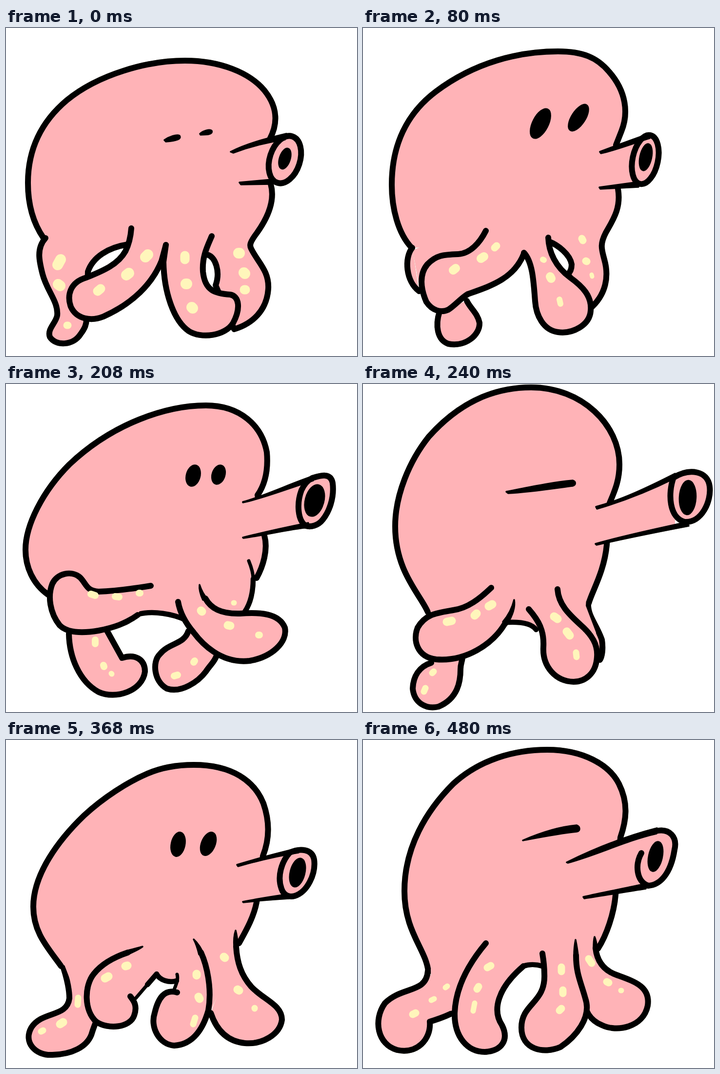
These frames come from a looping animation (720 px wide and 673 px high, 560 ms). An HTML page without scripts:

```html
<!DOCTYPE html>
<html lang="en">
<head>
<meta charset="utf-8">
<title>Walking octopus</title>
<style>
html, body { margin: 0; width: 100%; height: 100%; overflow: hidden; background: #fff; }
svg { display: block; width: 100%; height: 100%; }
path { stroke-linecap: round; stroke-linejoin: round; }
.skin { fill: #ffb3b7; stroke: #000; stroke-width: 12; }
.fill { fill: #ffb3b7; }
.line { fill: none; stroke: #000; stroke-width: 10.5; }
.thin { stroke-width: 7; }
.ink { stroke: #000; stroke-width: 2.5; }
path.ink { stroke-width: 3.5; }
.dot { fill: none; stroke: #fff6bb; }
.pose {
  visibility: hidden;
  filter: drop-shadow(0 0 .7px #d6cbb0);
  animation: show 560ms step-end calc(var(--i) * 80ms - 560ms) infinite;
}
@keyframes show {
  0% { visibility: visible; }
  14.2857%, 100% { visibility: hidden; }
}
</style>
</head>
<body>
<svg viewBox="0 0 720 673" preserveAspectRatio="none">

<g class="pose" style="--i:0">
  <path class="skin" d="M77 431C57 402 45 365 45 318C45 245 75 190 125 148C190 95 290 67 367 67C440 67 500 92 530 128C560 165 556 200 541 228L543 320C552 352 540 385 515 420C500 440 499 446 503 453C516 480 540 498 538 535C535 580 505 607 468 618L430 528C440 500 430 470 413 465"/>
  <path class="skin" d="M81 431C62 452 68 478 75 505C84 540 108 562 105 590C102 606 84 618 90 634C102 653 138 652 153 628C162 616 165 608 165 598L168 500C178 470 210 450 250 444"/>
  <path class="fill" d="M257 411L328 447L324 480L340 480L422 430L420 400Z"/>
  <path class="skin" d="M257 411C256 425 253 442 245 458C230 485 200 498 165 512C130 522 125 550 133 572C145 598 175 602 200 592C260 565 300 525 319 478L328 445"/>
  <path class="skin" d="M328 445L323 480C324 540 343 600 375 622C400 638 450 632 466 605C482 575 478 550 460 547C430 545 408 540 404 500C402 470 412 450 422 427"/>
  <path class="fill" d="M466 258L548 232V315L484 319Z"/>
  <ellipse class="skin" rx="31" ry="50" transform="translate(572 270)rotate(18)"/>
  <path class="ink" d="M461 254C490 239 525 229 575 217L572 229C530 235 495 245 466 256ZM479 317L545 311V320L482 321ZM325 230C335 223 350 218 356 221C360 228 350 231 328 233ZM398 217C405 211 418 207 422 211C424 218 414 219 399 219Z"/>
  <ellipse class="ink" rx="11" ry="22" transform="translate(572 268)rotate(18)"/>
  <path class="dot" stroke-width="22" d="M106 486l6-11M107 526l4 3M247 507l5-4M286 470l5-5M369 525h2M381 573l2 2M477 462h2M488 502l2 2"/>
  <path class="dot" stroke-width="19" d="M188 540l6-5M367 467v8M489 537h2"/>
  <path class="dot" stroke-width="15" d="M125 610h2"/>
</g>

<g class="pose" style="--i:1">
  <path class="skin" d="M100 451C72 422 59 370 59 322C59 240 90 175 150 130C230 70 320 48 400 48C450 48 480 60 505 90C540 130 545 175 530 212L519 240L523 330C530 370 512 395 498 420C485 445 490 455 495 475C505 510 498 545 470 572L420 505C424 502 428 495 428 485C425 465 400 445 381 438"/>
  <path class="fill" d="M102 456L240 400L380 430L330 462L230 480L130 540L116 535Z"/>
  <path class="skin" d="M101 451C84 472 88 520 115 540"/>
  <path class="skin" d="M157 582C148 610 152 640 175 648C210 655 240 630 239 605C235 585 220 575 213 560"/>
  <path class="skin" d="M252 416C240 440 220 463 195 464C165 465 150 466 132 485C115 505 118 535 130 562C142 580 160 585 175 578C190 568 200 555 215 546C260 530 310 515 330 463"/>
  <path class="skin" d="M380 430C381 460 395 490 425 512C450 530 470 550 467 580C465 610 430 628 400 624C370 620 355 590 353 560C350 520 348 480 330 461"/>
  <path class="fill" d="M488 257L575 225V320L488 329Z"/>
  <ellipse class="skin" rx="26" ry="51" transform="translate(579 270)rotate(12)"/>
  <path class="ink" d="M486 254C515 243 545 232 590 216L588 226C555 236 520 250 488 257ZM485 327L565 316V326L487 330Z"/>
  <ellipse class="ink" rx="12" ry="28" transform="translate(580 265)rotate(12)"/>
  <ellipse class="ink" rx="16" ry="33" transform="translate(364 196)rotate(27)"/>
  <ellipse class="ink" rx="14" ry="31" transform="translate(442 184)rotate(33)"/>
  <path class="dot" stroke-width="18" d="M185 497l5-4M242 473l6-4M384 510l2 4"/>
  <path class="dot" stroke-width="15" d="M270 451l4-4M449 432l2 4M457 478l2 1"/>
  <path class="dot" stroke-width="12" d="M369 475l2 1M403 557l2 9"/>
  <path class="dot" stroke-width="9" d="M469 506l1 4"/>
</g>

<g class="pose" style="--i:2">
  <path class="skin" d="M86 432C55 410 40 375 40 340C40 290 75 220 130 165C220 80 330 44 410 44C480 44 525 85 535 140C538 175 532 205 516 228L530 311C538 340 527 375 514 398"/>
  <path class="skin" d="M129 512C130 560 150 610 190 632C225 648 280 630 285 590C285 565 265 553 238 562L207 506"/>
  <path class="skin" d="M374 507C365 535 335 530 315 555C300 570 303 610 330 625C360 635 395 610 410 590C420 575 428 570 432 557"/>
  <path class="fill" d="M98 420L200 380L508 395L490 468L400 500L370 485Q320 462 270 473Z"/>
  <path class="line" d="M270 473C300 464 345 472 370 485"/>
  <path class="line thin" d="M498 363C505 380 507 390 507 400"/>
  <path class="line" d="M507 400C507 430 500 452 490 467"/>
  <path class="skin" d="M297 414C260 420 220 425 190 426C165 425 165 410 152 397C135 382 105 388 95 410C85 435 90 470 110 495C125 510 155 512 190 506C220 500 245 492 270 474"/>
  <path class="skin" d="M409 440C420 460 440 472 480 471C520 468 560 470 572 500C578 530 545 560 500 568C440 575 400 530 385 510C368 490 357 470 353 447"/>
  <path class="ink" d="M397 412C401 425 406 433 413 441L404 443C398 430 396 420 397 412Z"/>
  <path class="fill" d="M490 244L628 193L615 290L490 314Z"/>
  <path class="skin" d="M628 193C645 188 666 181 670 203C674 235 662 263 650 278C640 291 625 294 615 291C598 280 596 245 606 218C612 205 620 197 628 193Z"/>
  <path class="ink" d="M486 242C530 230 580 206 630 189L630 198C590 210 530 234 486 243ZM486 315C530 304 575 294 620 285V294C580 298 530 310 487 316Z"/>
  <ellipse class="ink" rx="19" ry="33" transform="translate(633 239)rotate(15)"/>
  <ellipse class="ink" rx="14" ry="22" transform="translate(384 188)rotate(15)"/>
  <ellipse class="ink" rx="13" ry="20" transform="translate(436 186)rotate(18)"/>
  <path class="dot" stroke-width="17" d="M400 465l2 2M455 495l5 1"/>
  <path class="dot" stroke-width="14" d="M174 431l9 3M224 436l8 1M273 429h2M518 515h2M183 525v8M200 577l1 3M385 571l2-3M345 599l7-2"/>
  <path class="dot" stroke-width="11" d="M467 449h1M216 594l1 1"/>
</g>

<g class="pose" style="--i:3">
  <path class="skin" d="M133 468C118 432 66 385 66 292C66 228 95 158 135 108C194 42 262 7 345 7C450 7 526 85 526 165C526 200 515 222 506 244L500 330C495 385 470 425 463 450"/>
  <path class="skin" d="M462 450C460 475 480 495 490 525C493 545 490 560 486 566"/>
  <path class="skin" d="M140 572C115 580 103 600 102 625C105 655 130 668 155 662C195 645 200 610 200 585C200 575 203 570 204 562"/>
  <path class="fill" d="M138 466L265 400L458 440L457 455L478 510L480 560L440 520L356 502Q330 486 297 489L250 460L150 475Z"/>
  <path class="line" d="M297 489C320 488 345 490 355 504"/>
  <path class="skin" d="M263 418C240 440 215 460 185 464C150 470 128 472 112 500C102 525 110 560 150 565C210 570 265 535 291 492"/>
  <path class="ink" d="M310 443C313 460 305 478 295 494L287 488C298 475 306 460 310 443Z"/>
  <path class="skin" d="M399 421C401 452 422 472 446 494C470 515 482 535 480 560C478 595 455 611 432 611C395 610 368 580 370 540C372 505 360 485 340 462"/>
  <path class="fill" d="M481 256L560 226L640 190V288L481 328Z"/>
  <path class="skin" d="M637 192C625 225 628 275 660 283C695 285 715 240 711 210C707 178 670 172 637 192Z"/>
  <path class="ink" d="M478 252C530 238 585 212 640 184L640 193C590 218 535 240 480 256ZM477 328C540 310 600 298 662 284L668 291C600 304 540 316 479 330Z"/>
  <ellipse class="ink" rx="17" ry="35" transform="translate(666 233)rotate(3)"/>
  <path class="ink" d="M294 221C340 212 385 202 430 198C437 200 437 207 430 209C385 215 340 222 298 224Z"/>
  <path class="dot" stroke-width="17" d="M172 488l10-2M229 475l4-4M258 456l7-4M392 477l7 5M418 508l6 8"/>
  <path class="dot" stroke-width="13" d="M142 593l3-3M125 631l3-7M437 551l1 9"/>
</g>

<g class="pose" style="--i:4">
  <path class="skin" d="M113 464C85 425 56 395 56 342C56 275 108 205 160 155C200 118 250 86 290 69C320 56 350 51 385 51C465 51 510 85 528 130C542 170 540 205 527 238L514 333C508 365 490 395 478 417"/>
  <path class="skin" d="M118 468C125 490 130 515 130 530C125 570 75 555 52 590C35 620 60 648 95 646C135 645 165 630 175 605C178 595 180 590 183 582"/>
  <path class="fill" d="M120 462L280 420L472 405L471 440L418 560L351 515L350 494Q320 498 309 480L265 528L200 500L190 578L150 540Z"/>
  <path class="skin" d="M472 424C474 456 482 482 503 506C528 533 566 543 566 574C562 605 525 625 490 622C450 618 430 590 420 560"/>
  <path class="ink" d="M471 391C474 402 475 412 476 424L468 424C467 410 468 400 471 391Z"/>
  <path class="skin" d="M400 436C412 462 423 510 415 555C405 590 385 625 345 627C315 625 295 590 305 560C312 530 325 510 351 518"/>
  <path class="ink" d="M385 409C395 418 400 428 405 438L396 440C393 428 390 418 385 409Z"/>
  <path class="line" d="M309 480C315 493 335 499 350 494M309 480L290 502"/>
  <path class="line thin" d="M290 502L266 530M351 481C354 493 348 503 345 512"/>
  <path class="skin" d="M250 436C220 446 195 461 180 480C160 505 160 555 185 578C210 595 255 590 263 565C270 545 262 535 255 526"/>
  <path class="ink" d="M280 424C272 430 262 434 252 439L250 432C260 429 270 427 280 424Z"/>
  <path class="fill" d="M478 258L582 231L570 320L490 331Z"/>
  <path class="skin" d="M582 231C604 221 628 224 632 245C636 275 618 312 592 320C582 323 570 320 565 305C556 280 565 250 582 231Z"/>
  <path class="ink" d="M474 256C510 245 550 234 600 222L600 231C560 237 515 248 476 259ZM486 332C520 325 550 321 580 316V325C550 327 520 329 487 333Z"/>
  <ellipse class="ink" rx="15" ry="30" transform="translate(598 272)rotate(14)"/>
  <ellipse class="ink" rx="14" ry="25" transform="translate(353 214)rotate(12)"/>
  <ellipse class="ink" rx="14" ry="25" transform="translate(415 213)rotate(22)"/>
  <path class="dot" stroke-width="17" d="M203 489l7-4M245 464l4-1M111 583l6-4M391 480v3M395 527l2 4M447 445l2 2M475 512l3 2"/>
  <path class="dot" stroke-width="13" d="M148 529l-1 14M72 598l4-2M388 570l-4 13M510 550v1"/>
</g>

<g class="pose" style="--i:5">
  <path class="skin" d="M142 475C138 410 101 380 101 305C101 220 150 150 200 110C260 65 315 42 365 42C430 42 490 85 525 130C552 165 550 200 543 222L529 325C522 365 505 405 482 432"/>
  <path class="fill" d="M148 468L160 458L200 430L475 425L385 440C385 500 360 545 315 574L280 544L205 485Z"/>
  <path class="line" d="M384 442C385 500 360 545 315 574"/>
  <path class="skin" d="M152 465C143 480 130 488 105 488C75 488 50 470 25 475C5 485 5 520 15 550C30 580 60 588 95 582C140 575 185 530 208 485"/>
  <path class="ink" d="M161 457C156 464 152 469 148 472L146 466C152 464 157 461 161 457Z"/>
  <path class="skin" d="M464 427L514 470C545 470 590 460 598 492C602 530 570 578 515 576C450 570 395 510 385 450"/>
  <path class="ink" d="M385 438L389 452L381 452Z"/>
  <path class="skin" d="M210 475C212 520 210 560 225 595C240 628 285 640 303 605C315 570 305 548 280 544"/>
  <path d="M275 482C280 460 300 452 315 463C325 480 310 505 286 513Z" fill="#fff"/>
  <path class="line" d="M277 478C282 460 300 452 315 463C322 478 314 493 304 502M278 484C278 505 281 520 287 536"/>
  <path class="line thin" d="M304 502C299 508 293 511 286 513M274 473L277 485"/>
  <path class="fill" d="M466 260L545 230L620 212L600 311L476 324Z"/>
  <path class="skin" d="M620 212C645 210 657 225 655 250C652 285 635 308 605 311C580 310 570 285 583 255"/>
  <path class="ink" d="M462 260C510 232 560 217 622 207L622 217C560 227 510 242 464 262ZM472 324C515 316 560 312 600 307V318C560 320 515 325 473 326Z"/>
  <ellipse class="ink" rx="18" ry="33" transform="translate(619 263)rotate(16)"/>
  <rect class="ink" x="-12" y="-30" width="24" height="60" rx="12" transform="translate(355 207)rotate(10)"/>
  <rect class="ink" x="-12" y="-26" width="24" height="52" rx="12" transform="translate(416 207)rotate(22)"/>
  <path class="dot" stroke-width="22" d="M450 448l5 3M485 479l5 4"/>
  <path class="dot" stroke-width="15" d="M64 505h8M121 506l5-2M246 497l2 3M350 483l-2 6M339 516l-2 2"/>
  <path class="dot" stroke-width="10" d="M152 487h1M251 526l2 9M252 551h2M439 446l3 3M527 496l3-1"/>
</g>

<g class="pose" style="--i:6">
  <path class="skin" d="M134 476C130 430 85 395 85 310C85 220 130 145 185 90C240 40 310 20 378 20C450 20 505 50 525 90C545 130 540 165 528 200L518 318C515 355 500 400 482 428"/>
  <path class="skin" d="M133 474C130 520 80 505 45 540C20 575 30 625 70 636C110 645 140 615 137 578C155 572 170 568 187 558"/>
  <path class="fill" d="M139 470L250 417L474 410L476 430L460 540L372 480L368 464Q345 458 329 464L250 470L187 555L140 560Z"/>
  <path class="line" d="M329 464C340 460 355 460 368 464"/>
  <path class="skin" d="M477 427C480 455 495 473 520 482C555 495 590 505 584 545C575 590 520 600 490 585C465 575 455 555 452 530"/>
  <path class="ink" d="M475 404C478 410 479 420 481 428L473 428C473 420 473 410 475 404Z"/>
  <path class="skin" d="M437 442C437 480 447 497 456 530C470 570 435 610 405 630C370 645 325 635 325 590C325 540 375 540 372 480C372 465 370 450 368 438"/>
  <path class="ink" d="M436 410C438 420 440 432 441 442L433 442C433 430 434 420 436 410Z"/>
  <path class="skin" d="M252 417C220 455 190 505 188 560C187 610 215 640 250 640C285 638 300 615 285 585C265 555 275 510 329 464"/>
  <path class="fill" d="M424 250L528 206L600 187L575 299L456 323Z"/>
  <path class="skin" d="M600 187C630 180 645 200 639 225C633 265 615 297 585 299C560 290 558 255 571 232"/>
  <path class="ink" d="M418 251C475 223 540 197 603 181L602 192C540 206 480 236 420 252ZM452 322C495 312 540 304 580 295V305C540 311 495 319 454 325ZM328 206C365 190 405 178 438 175C446 178 446 187 438 188C400 192 360 200 328 206Z"/>
  <ellipse class="ink" rx="14" ry="31" transform="translate(600 239)rotate(12)"/>
  <path class="dot" stroke-width="15" d="M255 467l7-4M237 506l-3 5M102 563l6-3M407 466v9M410 513v7M407 551l-4 4M463 449l6 9M500 496l4 2"/>
  <path class="dot" stroke-width="11" d="M229 540l-3 16M169 508l4-3M140 534l6-3M529 514h1"/>
</g>

</svg>
</body>
</html>
```
